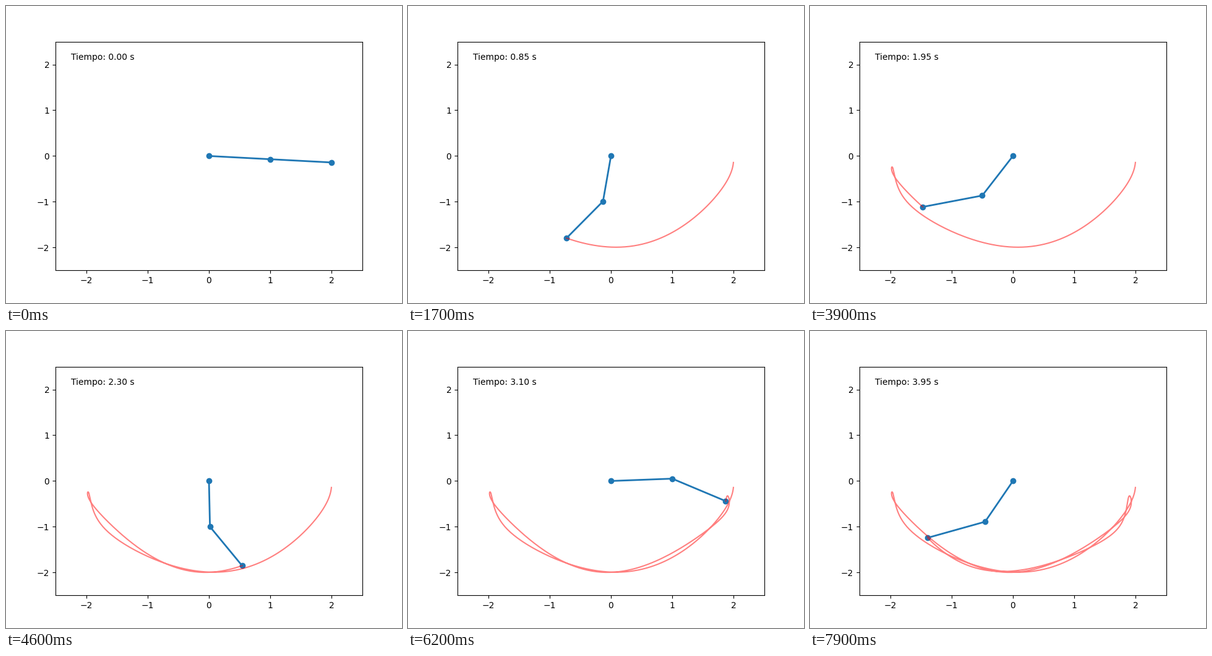
Write a matplotlib script that moves like this. It is 640 by 480 pixels and loops after 8 s.

```python
import numpy as np
import matplotlib.pyplot as plt
from matplotlib.animation import FuncAnimation

G = 9.81
DT = 0.01          # integration step, s
SUBSTEPS = 5       # integration steps per frame
FRAMES = 80
START = (1.5, 1.5, 0.0, 0.0)   # angles and angular speeds


def derivs(state):
    """Double pendulum with unit masses and unit rods."""
    a, b, wa, wb = state
    s, c = np.sin(a - b), np.cos(a - b)
    p = -wb**2 * s - 2 * G * np.sin(a)
    q = wa**2 * s - G * np.sin(b)
    acc_a = (p - c * q) / (2 - c**2)
    return np.array([wa, wb, acc_a, q - c * acc_a])


def rk4(state, h):
    k1 = derivs(state)
    k2 = derivs(state + h / 2 * k1)
    k3 = derivs(state + h / 2 * k2)
    k4 = derivs(state + h * k3)
    return state + h / 6 * (k1 + 2 * k2 + 2 * k3 + k4)


states = [np.array(START)]
for _ in range(FRAMES * SUBSTEPS):
    states.append(rk4(states[-1], DT))
th1, th2 = np.array(states).T[:2]

x1, y1 = np.sin(th1), -np.cos(th1)
x2, y2 = x1 + np.sin(th2), y1 - np.cos(th2)

plt.rcParams["font.family"] = "DejaVu Sans"
fig, ax = plt.subplots(figsize=(6.4, 4.8), dpi=100)
ax.set_xlim(-2.5, 2.5)
ax.set_ylim(-2.5, 2.5)

rods, = ax.plot([], [], "o-", lw=2)
trail, = ax.plot([], [], "r-", lw=1.5, alpha=0.5)
clock = ax.text(0.05, 0.95, "", transform=ax.transAxes, va="top")


def update(frame):
    i = frame * SUBSTEPS
    rods.set_data([0, x1[i], x2[i]], [0, y1[i], y2[i]])
    trail.set_data(x2[:i + 1], y2[:i + 1])
    clock.set_text(f"Tiempo: {i * DT:.2f} s")
    return rods, trail, clock


anim = FuncAnimation(fig, update, frames=FRAMES, interval=100,
                     repeat=True, repeat_delay=0, blit=False)
plt.show()
```
